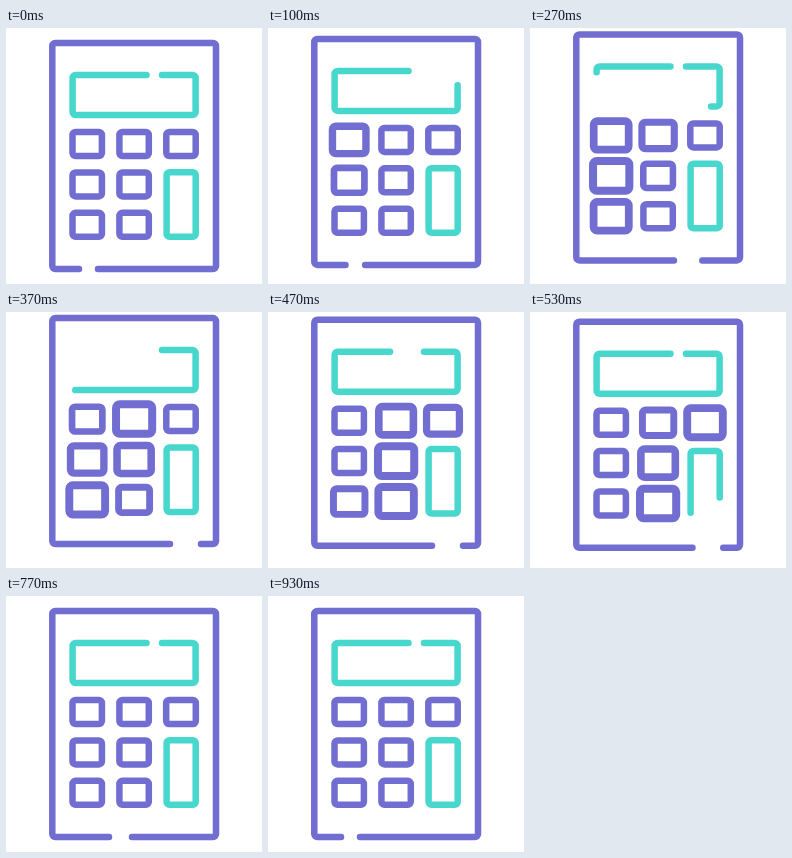
Animation of 256x256 px, one loop 1530 ms. Source, as an HTML page with a canvas:

```html
<!DOCTYPE html>
<html>
<head>
<meta charset="utf-8">
<title>Calculator</title>
<style>
html, body { margin: 0; height: 100%; overflow: hidden; background: #fff; }
canvas { display: block; width: 100vw; height: 100vh; }
</style>
</head>
<body>
<canvas id="stage" width="256" height="256"></canvas>
<script>
const ctx = document.getElementById('stage').getContext('2d');
const PURPLE = '#726dd1', TEAL = '#47d7cd';
const LOOP = 1530, STEP = 100 / 3, LAST = 28;

const progress = (k, from, to) => Math.min(1, Math.max(0, (k - from) / (to - from)));

function ease(k, from, to) {
  const s = progress(k, from, to);
  return s * s * (3 - 2 * s);
}

// Halfway between linear and eased
const softEase = (k, from, to) => (progress(k, from, to) + ease(k, from, to)) / 2;

// Runs along a rounded box from (startX, startY), through its corners, to (endX, endY)
function trace(start, corners, end, radius) {
  const points = [...corners, end];
  ctx.beginPath();
  ctx.moveTo(...start);
  corners.forEach((corner, i) => ctx.arcTo(...corner, ...points[i + 1], radius));
  ctx.lineTo(...end);
}

// Strokes the part of the current path between two fractions of its length
function strokePart(length, from, to) {
  const part = (to - from) * length;
  if (part < .5) return;
  ctx.setLineDash([part + .5, 2 * length]);
  ctx.lineDashOffset = -from * length;
  ctx.stroke();
  ctx.setLineDash([]);
}

// The old line is wiped from its start while a new one follows
function redraw(length, wiped, drawn) {
  strokePart(length, wiped, 1);
  strokePart(length, 0, drawn);
}

function drawBody(k) {
  const left = 46.3, right = 210, top = 15, bottom = 241;
  const gap = ease(k, 1.8, 10.7) - ease(k, 15, 28);
  trace([92 + 103 * gap, bottom],
    [[right, bottom], [right, top], [left, top], [left, bottom]],
    [73 + 91 * gap, bottom], 3);
  ctx.stroke();
}

// Seven buttons pulse one after another, column by column
function drawButtons(k) {
  for (let i = 0; i < 7; i++) {
    const start = 1.9 * i;
    const pulse = Math.abs(Math.sin(Math.PI * progress(k, start, start + 12))) ** 1.5;
    const scale = 1 + .235 * pulse;
    ctx.save();
    ctx.translate(81.2 + 46.9 * Math.floor(i / 3), 116 + 40.4 * (i % 3));
    ctx.scale(scale, scale);
    ctx.beginPath();
    ctx.roundRect(-14.7, -12, 29.4, 24, 3);
    ctx.stroke();
    ctx.restore();
  }
}

function drawScreen(k) {
  const left = 66.6, right = 189.6, top = 47, bottom = 87;
  trace([156, top],
    [[right, top], [right, bottom], [left, bottom], [left, top]],
    [140.5, top], 3);
  redraw(305.5, softEase(k, 1, 11), softEase(k, 5, 15));
}

function drawTallKey(k) {
  const left = 160.6, right = 189.7, top = 144.3, bottom = 208.8, startY = 206;
  trace([left, startY],
    [[left, bottom], [right, bottom], [right, top], [left, top]],
    [left, startY], 2.8);
  redraw(182.5, ease(k, 14, 20), ease(k, 17, 23));
}

function frame(now) {
  const k = Math.min(LAST, Math.floor((now % LOOP + 5) / STEP));
  ctx.clearRect(0, 0, 256, 256);
  ctx.save();
  ctx.lineWidth = 6.5;
  ctx.lineCap = ctx.lineJoin = 'round';
  ctx.translate(0, -9 * Math.sin(Math.PI * progress(k, 0, 20)));
  ctx.strokeStyle = PURPLE;
  drawBody(k);
  drawButtons(k);
  ctx.strokeStyle = TEAL;
  drawScreen(k);
  drawTallKey(k);
  ctx.restore();
}

const began = performance.now();
function tick() {
  frame(performance.now() - began);
  requestAnimationFrame(tick);
}
tick();
</script>
</body>
</html>
```
